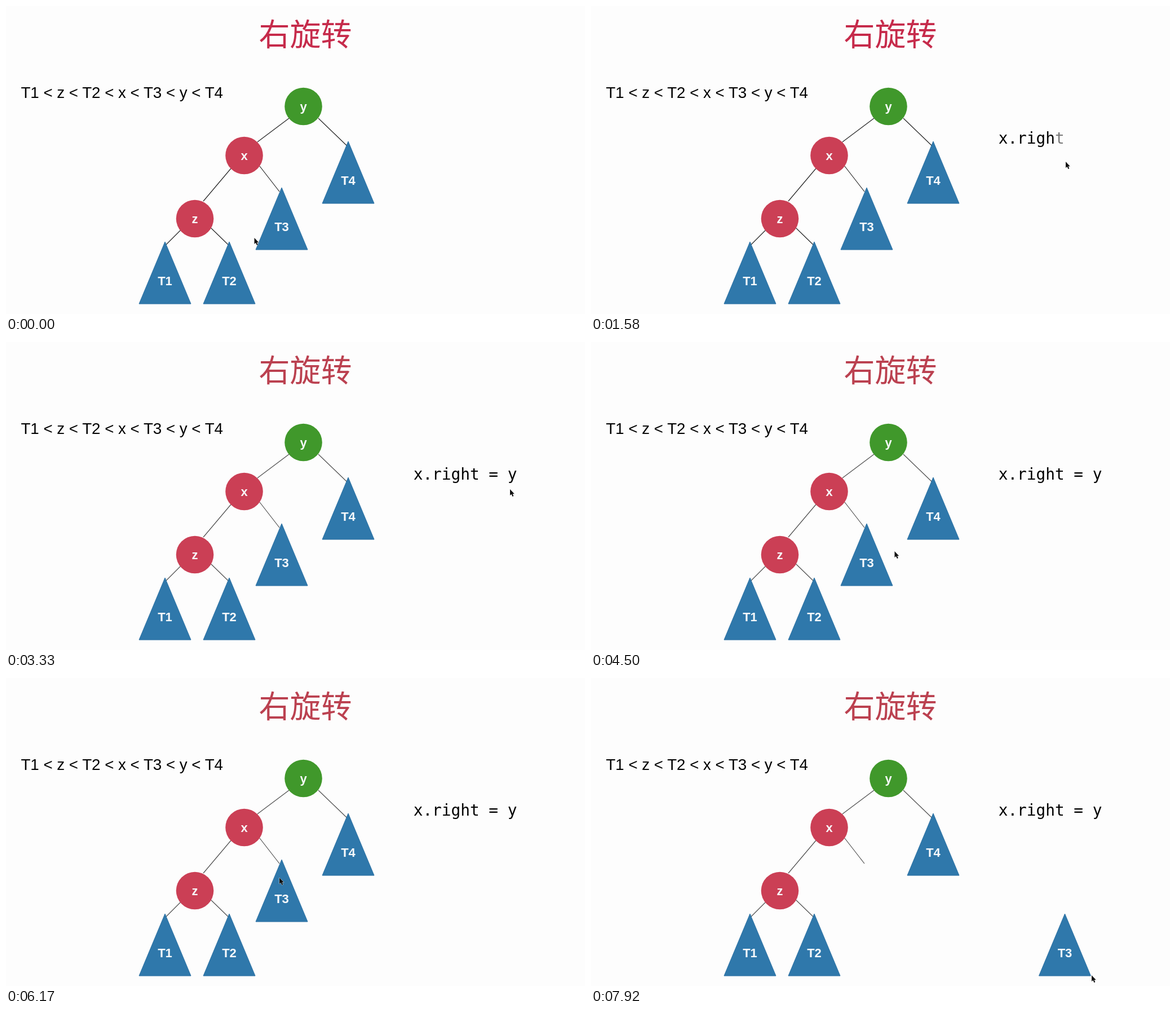
These frames come from a looping animation (1027 px wide and 546 px high, 8000 ms). An HTML page:

```html
<!DOCTYPE html>
<html lang="zh">
<head>
<meta charset="utf-8">
<title>右旋转</title>
<style>
html, body { margin: 0; width: 100%; height: 100%; overflow: hidden; background: #fdfdfd; }
svg { display: block; width: 100vw; height: 100vh; }
.title { font: 300 55px "Noto Sans CJK SC", "Noto Sans CJK", sans-serif; text-anchor: middle; }
.order { font: 27.7px "Liberation Sans", Arial, sans-serif; }
.code { font: 27.74px "DejaVu Sans Mono", monospace; white-space: pre; }
.label { font: bold 22px "Liberation Sans", Arial, sans-serif; fill: #f8fafc; text-anchor: middle; }
.edge { stroke-width: 1.2; }
</style>
</head>
<body>
<svg id="stage" viewBox="0 0 1027 546" xmlns="http://www.w3.org/2000/svg"></svg>
<script>
const LOOP = 8000;
const STEP = 1000 / 12;
const TINT_AT = 2500;
const TYPE_START = 990;
const TYPE_STEP = 91;
const CODE = "x.right = y";
const RED = "#cb3f55", GREEN = "#40982b", BLUE = "#2f78ab";

const stage = document.getElementById("stage");

function add(tag, attrs, parent = stage, text = "") {
  const el = document.createElementNS("http://www.w3.org/2000/svg", tag);
  for (const key in attrs) el.setAttribute(key, attrs[key]);
  el.textContent = text;
  parent.append(el);
  return el;
}

function node(name, x, y, fill, baseline) {
  add("circle", { cx: x, cy: y, r: 33.3, fill });
  add("text", { x, y: baseline, class: "label" }, stage, name);
}

// A subtree is positioned by the middle of its base.
function subtree(name, x, y) {
  const g = add("g", { transform: `translate(${x} ${y})` });
  add("path", {
    d: "M0 -110L46 0H-46Z", fill: BLUE,
    stroke: "#2c71a3", "stroke-width": 1, "stroke-linejoin": "round"
  }, g);
  add("text", { x: 0, y: -33.5, class: "label" }, g, name);
  return g;
}

const title = add("text", { x: 531, y: 70, class: "title" }, stage, "右旋转");
add("text", { x: 26.4, y: 163, class: "order" }, stage, "T1 < z < T2 < x < T3 < y < T4");

const code = add("text", { x: 722.7, y: 244, class: "code" });
const letters = [...CODE].map(ch => add("tspan", {}, code, ch));

const edges = add("path", {
  class: "edge", fill: "none",
  d: "M502 199L446 241M554 199L606 249M399 288L350 346M450 284L485 329M310 397L283 424M363 393L395 424"
});

node("y", 527.5, 178, GREEN, 186);
node("x", 422.5, 265, RED, 273);
node("z", 335, 377, RED, 385);
subtree("T1", 282, 528);
subtree("T2", 396, 528);
subtree("T4", 607, 350);
const moving = subtree("T3", 489, 432);

const cursor = add("path", {
  d: "M0 0V11L2.5 8.8L4.4 13L6.4 12.1L4.5 8.2H7.8Z",
  fill: "#111", stroke: "#fff", "stroke-width": 0.8, "paint-order": "stroke"
});

// time, x, y
const cursorPath = [
  [0, 440.5, 411], [250, 440.5, 411], [1330, 842, 276], [1900, 842, 276],
  [2900, 894, 261], [3500, 894, 261], [4420, 538.5, 371], [4900, 538.5, 371],
  [5700, 485, 354], [6250, 485, 354], [6850, 909, 417], [7100, 909, 417],
  [7850, 888, 527], [LOOP, 888, 527]
];
const subtreePath = [
  [0, 489, 432], [6417, 489, 432], [7417, 840.5, 528], [LOOP, 840.5, 528]
];

const clamp = v => Math.min(1, Math.max(0, v));
const ease = p => (1 - Math.cos(Math.PI * p)) / 2;

function at(path, t) {
  const i = Math.max(1, path.findIndex(k => k[0] > t));
  const [t0, x0, y0] = path[i - 1], [t1, x1, y1] = path[i];
  const p = ease(clamp((t - t0) / (t1 - t0)));
  return [x0 + (x1 - x0) * p, y0 + (y1 - y0) * p];
}

function place(el, path, t) {
  el.setAttribute("transform", `translate(${at(path, t).map(v => v.toFixed(2)).join(" ")})`);
}

function draw(time) {
  const t = Math.floor(((time % LOOP) + 4) / STEP) % 96 * STEP;
  const late = t >= TINT_AT;
  title.setAttribute("fill", late ? "#bb4150" : "#c62b4b");
  edges.setAttribute("stroke", late ? "#505050" : "#262626");
  letters.forEach((el, i) => {
    el.setAttribute("fill-opacity", clamp((t - TYPE_START) / TYPE_STEP - i));
  });
  place(moving, subtreePath, t);
  place(cursor, cursorPath, t);
}

function tick() {
  draw(performance.now());
  requestAnimationFrame(tick);
}
tick();
</script>
</body>
</html>
```
